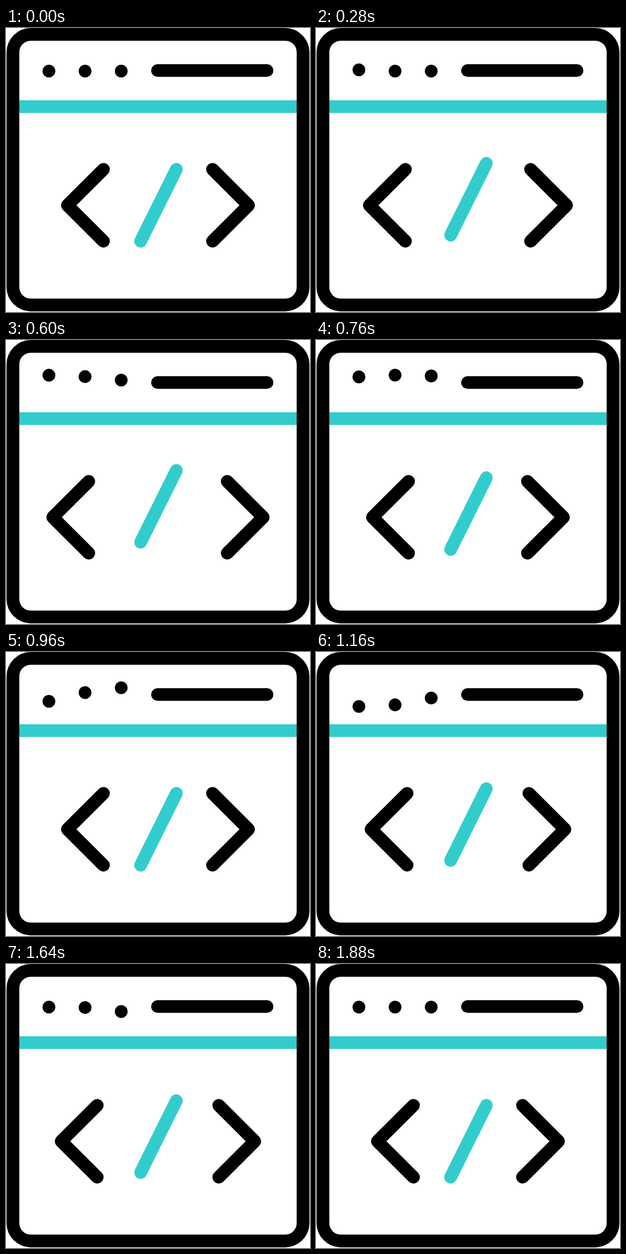
An HTML page that plays this animation: 486 px wide and 455 px high, repeating every 1.92 s.

```html
<!DOCTYPE html>
<html lang="en">
<head>
<meta charset="utf-8">
<title>Code window</title>
<style>
  html, body { margin: 0; width: 100%; height: 100%; overflow: hidden; background: #fff; }
  svg { display: block; width: 486px; height: 455px; }
  .line { fill: none; stroke: #000; stroke-width: 20.4; stroke-linecap: round; stroke-linejoin: round; }
  .accent { stroke: #33cccc; }
</style>
</head>
<body>
<svg viewBox="0 0 486 455">
  <rect x="21" y="115.7" width="444" height="20.4" fill="#33cccc"/>
  <rect class="line" x="11.1" y="10.2" width="463.8" height="433.6" rx="28.7"/>
  <path class="line" d="M242.2 68.1H417.3"/>
  <circle class="dot" cx="68.6" cy="69" r="10.3"/>
  <circle class="dot" cx="126.4" cy="69" r="10.3"/>
  <circle class="dot" cx="184.2" cy="69" r="10.3"/>
  <path id="left" class="line" d="M155.8 226.5L98.2 284L155.8 341.5"/>
  <path id="slash" class="line accent" d="M272.3 226.5L215.2 341.5"/>
  <path id="right" class="line" d="M330.2 226.5L387.7 284L330.2 341.5"/>
</svg>
<script>
  const LOOP = 1920, STEP = 40;
  const left = document.getElementById('left');
  const right = document.getElementById('right');
  const slash = document.getElementById('slash');
  const dots = document.querySelectorAll('.dot');

  // Keys are [time in steps, value].
  const SPREAD = [[1.5, 0], [12.5, 1], [23.3, 0], [24, 0], [35.2, 1], [45.6, 0]];
  const BOUNCE = [[3.2, 0], [16, -12.7], [28.8, 18.3], [39.6, 0]];
  const DOT_DELAY = 3.1;

  // cubic-bezier(.5, 0, .5, 1), solved by bisection
  function ease(x) {
    let lo = 0, hi = 1;
    for (let i = 0; i < 24; i++) {
      const s = (lo + hi) / 2;
      if (1.5 * s * (1 - s) + s * s * s < x) lo = s; else hi = s;
    }
    return lo * lo * (3 - 2 * lo);
  }

  function valueAt(keys, t) {
    if (t <= keys[0][0]) return keys[0][1];
    for (let i = 1; i < keys.length; i++) {
      const [t0, v0] = keys[i - 1], [t1, v1] = keys[i];
      if (t < t1) return v0 + (v1 - v0) * ease((t - t0) / (t1 - t0));
    }
    return keys[keys.length - 1][1];
  }

  const move = (el, x, y) => el.setAttribute('transform', `translate(${x.toFixed(2)} ${y.toFixed(2)})`);

  function draw(ms) {
    const t = Math.floor((ms % LOOP) / STEP);
    const spread = valueAt(SPREAD, t);
    move(left, -25.8 * spread, 0);
    move(right, 25.8 * spread, 0);
    move(slash, 0, -19.3 * spread);
    dots.forEach((dot, i) => move(dot, 0, valueAt(BOUNCE, t - i * DOT_DELAY)));
  }

  let start;
  function tick(now) {
    start ??= now;
    draw(now - start);
    requestAnimationFrame(tick);
  }
  draw(0);
  requestAnimationFrame(tick);
</script>
</body>
</html>
```
